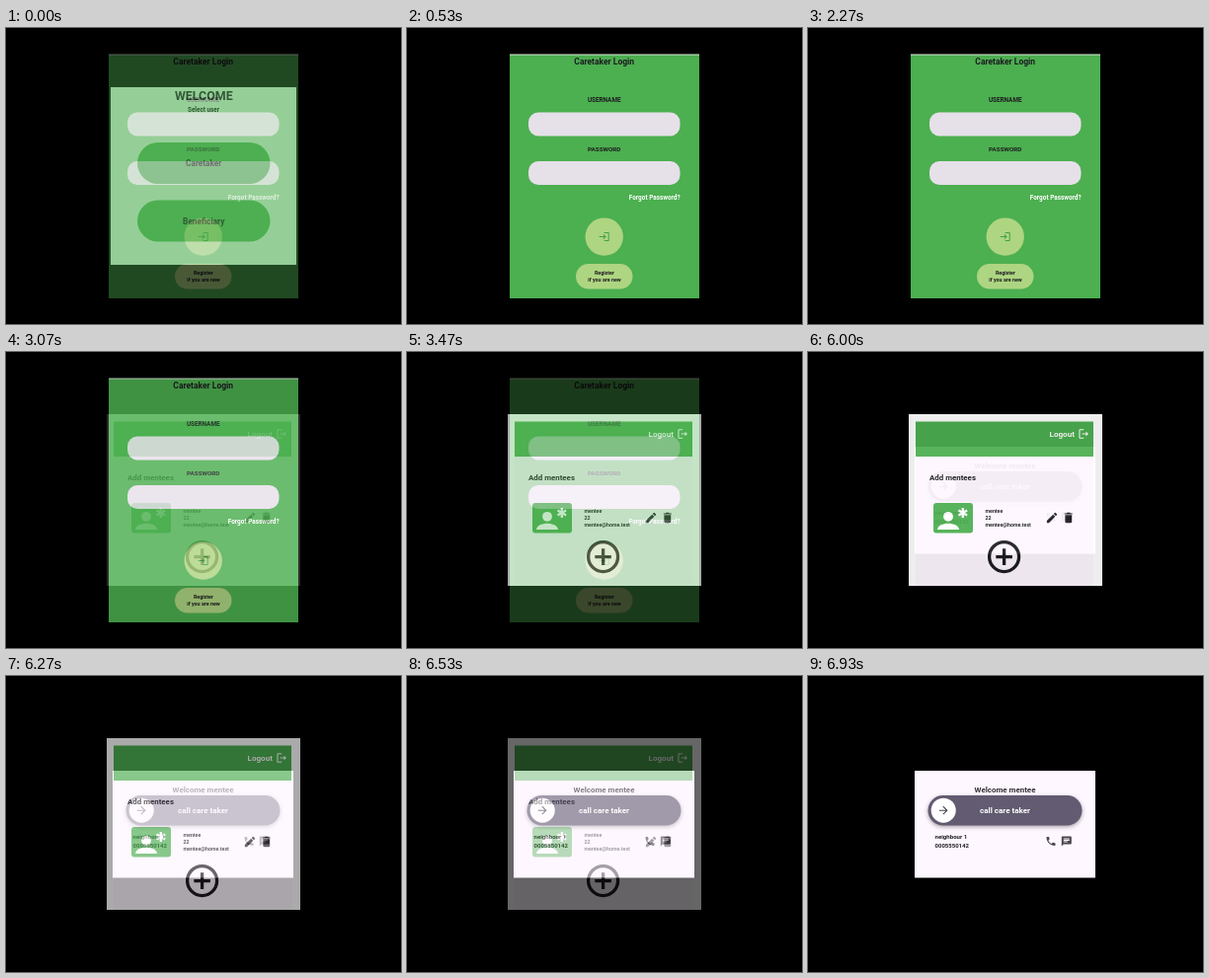
Animation, 400 px wide and 300 px high, one loop 8 s. Source, as an HTML page with a canvas:

```html
<!DOCTYPE html>
<html lang="en">
<head>
<meta charset="utf-8">
<title>Care app screens</title>
<style>
html, body { margin: 0; width: 100%; height: 100%; overflow: hidden; background: #000; }
canvas { display: block; width: 400px; height: 300px; }
</style>
</head>
<body>
<canvas id="stage" width="400" height="300"></canvas>
<script>
const W = 400, H = 300, LOOP = 8000, STEP = 1000 / 15;
const GREEN = '#4caf50', LIME = '#aed581', INK = '#1d1b20', PAPER = '#fef7ff', GREY = '#49454f';

const ICONS = {
  login: 'M11 7L9.6 8.4l2.6 2.6H2v2h10.2l-2.6 2.6L11 17l5-5-5-5zm9 12h-8v2h8c1.1 0 2-.9 2-2V5c0-1.1-.9-2-2-2h-8v2h8v14z',
  logout: 'M17 8l-1.41 1.41L17.17 11H9v2h8.17l-1.58 1.58L17 16l4-4-4-4zM5 5h7V3H5c-1.1 0-2 .9-2 2v14c0 1.1.9 2 2 2h7v-2H5V5z',
  edit: 'M3 17.25V21h3.75L17.81 9.94l-3.75-3.75L3 17.25zM20.71 7.04a1 1 0 0 0 0-1.41l-2.34-2.34a1 1 0 0 0-1.41 0l-1.83 1.83 3.75 3.75 1.83-1.83z',
  bin: 'M6 19c0 1.1.9 2 2 2h8c1.1 0 2-.9 2-2V7H6v12zM19 4h-3.5l-1-1h-5l-1 1H5v2h14V4z',
  arrow: 'M12 4l-1.41 1.41L16.17 11H4v2h12.17l-5.58 5.59L12 20l8-8z',
  phone: 'M6.62 10.79c1.44 2.83 3.76 5.14 6.59 6.59l2.2-2.2c.27-.27.67-.36 1.02-.24 1.12.37 2.33.57 3.57.57.55 0 1 .45 1 1V20c0 .55-.45 1-1 1-9.39 0-17-7.61-17-17 0-.55.45-1 1-1h3.5c.55 0 1 .45 1 1 0 1.25.2 2.45.57 3.57.11.35.03.74-.25 1.02l-2.2 2.2z',
  chat: 'M20 2H4c-1.1 0-2 .9-2 2v18l4-4h14c1.1 0 2-.9 2-2V4c0-1.1-.9-2-2-2zM6 9h12v2H6V9zm8 5H6v-2h8v2zm4-6H6V6h12v2z'
};

function screen(draw) {
  const layer = document.createElement('canvas');
  layer.width = W;
  layer.height = H;
  const g = layer.getContext('2d');
  draw({
    g,
    rect(x, y, w, h, color) {
      g.fillStyle = color;
      g.fillRect(x, y, w, h);
    },
    round(x, y, w, h, r, color) {
      g.fillStyle = color;
      g.beginPath();
      g.roundRect(x, y, w, h, r);
      g.fill();
    },
    disc(x, y, r, color) {
      g.fillStyle = color;
      g.beginPath();
      g.arc(x, y, r, 0, Math.PI * 2);
      g.fill();
    },
    // y is the middle of the capitals
    text(str, x, y, size, color = INK, align = 'center') {
      g.font = `700 ${size}px Roboto, Arial, sans-serif`;
      g.textAlign = align;
      g.fillStyle = color;
      g.fillText(str, x, y + size * 0.355);
    },
    icon(name, x, y, scale, color) {
      g.save();
      g.translate(x, y);
      g.scale(scale, scale);
      g.translate(-12, -12);
      g.fillStyle = color;
      g.fill(new Path2D(ICONS[name]));
      g.restore();
    }
  });
  return layer;
}

const welcome = screen(({ rect, round, text }) => {
  rect(106, 60, 188, 180, '#c8e6c9');
  text('WELCOME', 200.3, 69, 12.4);
  text('Select user', 200, 82.3, 6.35);
  round(133, 116, 134.5, 42, 21, GREEN);
  text('Caretaker', 200.2, 137, 8.25);
  round(133, 174.5, 134.5, 42, 21, GREEN);
  text('Beneficiary', 200.2, 195.6, 8.3);
});

const login = screen(({ rect, round, disc, text, icon }) => {
  const field = '#e6e0e9';
  rect(104, 27, 192, 247, GREEN);
  rect(104, 26.5, 192, 1, '#dcebdc');
  text('Caretaker Login', 199.7, 33.5, 8.5);
  text('USERNAME', 199.7, 72.8, 6.35);
  round(123, 85.5, 153.5, 24, 10, field);
  text('PASSWORD', 199.7, 122.3, 6.25);
  round(123, 135, 153.5, 24, 10, field);
  text('Forgot Password?', 276.6, 171.3, 6.4, '#fff', 'right');
  disc(199.7, 211.6, 19.2, LIME);
  icon('login', 199.7, 211.6, 0.5, '#43a047');
  round(171, 239, 57.5, 25.5, 12.75, LIME);
  text('Register', 199.9, 248, 5.3);
  text('if you are new', 200, 255.6, 5.35);
});

const list = screen(({ g, rect, round, disc, text, icon }) => {
  rect(102, 63, 196, 174, '#fff');
  rect(109, 106, 180, 131, PAPER);
  rect(109, 70.5, 180, 35.5, GREEN);
  text('Logout', 244.5, 83.2, 8.1, '#fff', 'left');
  icon('logout', 279.2, 83, 0.53, '#fff');
  text('Add mentees', 123, 127.4, 7.9, INK, 'left');

  round(127, 153, 40, 30.5, 3, GREEN);
  disc(142, 166.8, 4.9, '#fff');
  g.beginPath();
  g.moveTo(131, 180);
  g.bezierCurveTo(131.5, 171.5, 152.5, 171.5, 153, 180);
  g.fill();
  g.strokeStyle = '#fff';
  g.lineWidth = 2.3;
  g.beginPath();
  for (let i = 0; i < 3; i++) {
    const a = Math.PI / 2 + i * Math.PI / 3;
    const dx = 5 * Math.cos(a), dy = 5 * Math.sin(a);
    g.moveTo(156.8 - dx, 163 - dy);
    g.lineTo(156.8 + dx, 163 + dy);
  }
  g.stroke();

  ['mentee', '22', 'mentee@home.test'].forEach((s, i) =>
    text(s, 179.5, 161 + i * 7.1, 5.25, INK, 'left'));
  icon('edit', 247, 168, 0.57, INK);
  icon('bin', 263.8, 168, 0.57, INK);

  g.strokeStyle = INK;
  g.lineWidth = 3.3;
  g.beginPath();
  g.arc(198.6, 207.6, 15, 0, Math.PI * 2);
  g.moveTo(190.3, 207.6);
  g.lineTo(206.9, 207.6);
  g.moveTo(198.6, 199.3);
  g.lineTo(198.6, 215.9);
  g.stroke();
});

const call = screen(({ g, rect, round, disc, text, icon }) => {
  rect(108, 96, 183, 108.5, PAPER);
  text('Welcome mentee', 199.5, 115.6, 7.95, '#333036');
  g.shadowColor = 'rgba(0,0,0,.35)';
  g.shadowBlur = 4;
  g.shadowOffsetY = 1.5;
  round(121.5, 121, 156, 30.5, 15.25, '#625b71');
  g.shadowColor = 'transparent';
  disc(137.2, 136.2, 12.5, '#fff');
  icon('arrow', 137.2, 136.2, 0.55, GREY);
  text('call care taker', 199.5, 136.4, 8, '#fff');
  text('neighbour 1', 128.5, 163.2, 6.1, INK, 'left');
  text('0005550142', 128.5, 172, 6, INK, 'left');
  icon('phone', 246, 167.4, 0.5, GREY);
  icon('chat', 261.8, 167.6, 0.5, GREY);
});

// Each dissolve starts at a tick and lasts a number of ticks.
const FADES = [
  { from: welcome, to: login, start: -4, ticks: 12 },
  { from: login, to: list, start: 44, ticks: 12 },
  { from: list, to: call, start: 89, ticks: 15 }
];

const ctx = document.getElementById('stage').getContext('2d');

function layer(img, alpha) {
  ctx.globalAlpha = alpha;
  ctx.drawImage(img, 0, 0);
}

function render(ms) {
  const tick = Math.max(1, Math.floor((ms % LOOP + 5) / STEP));
  const fade = FADES.filter(f => tick >= f.start).pop();
  const mix = Math.min(1, (tick - fade.start) / fade.ticks);
  ctx.globalCompositeOperation = 'source-over';
  ctx.globalAlpha = 1;
  ctx.fillStyle = '#000';
  ctx.fillRect(0, 0, W, H);
  ctx.globalCompositeOperation = 'lighter';
  layer(fade.from, 1 - mix);
  layer(fade.to, mix);
}

const begin = performance.now();
function loop() {
  render(performance.now() - begin);
  requestAnimationFrame(loop);
}
loop();
</script>
</body>
</html>
```
